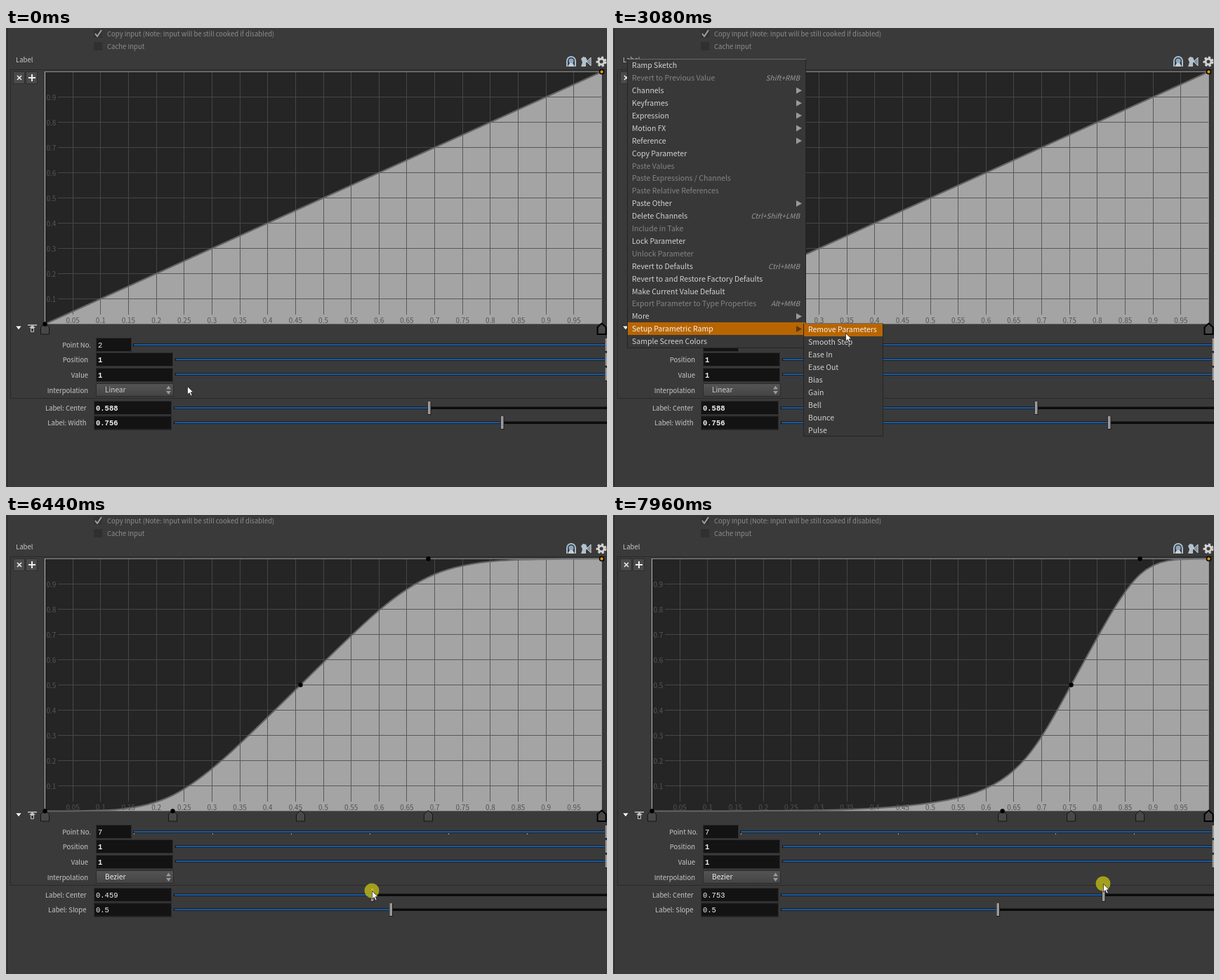
These frames come from a looping animation (856x655 px, 8 s). An HTML page with a canvas:

```html
<!DOCTYPE html>
<html lang="en">
<head>
<meta charset="utf-8">
<title>Ramp editor</title>
<style>
html, body { margin: 0; width: 100%; height: 100%; overflow: hidden; background: #3a3a3a; }
canvas { display: block; width: 856px; height: 655px; }
</style>
</head>
<body>
<canvas id="stage" width="856" height="655"></canvas>
<script>
const ctx = document.getElementById('stage').getContext('2d');
const SANS = '"Noto Sans CJK JP","Noto Sans CJK SC","Noto Sans CJK","Noto Sans",sans-serif';
const MONO = '"Liberation Mono","Noto Sans Mono",monospace';
const LOOP = 8000, ACCENT = '#b86500';
const MENU_OPEN = 1000, SUB_OPEN = 1880, MENU_CLOSE = 3880, RAMP_SET = 3960, DRAG = 6240;

// time, x, y of the pointer before the drag; each leg is eased
const travel = [
  [0, 258, 511], [200, 258, 511], [960, 17, 44], [1360, 17, 44], [1900, 131, 434],
  [2680, 131, 434], [3080, 331, 435], [3480, 318, 449], [3959, 318, 449], [3960, 28, 112],
  [4100, 28, 112], [4160, 62, 131], [4960, 450, 525], [5240, 557, 555], [5400, 547, 532],
  [5559, 547, 532], [5560, 547, 538], [DRAG, 547, 538]
];
// time, x, y and centre value while dragging
const drag = [
  [DRAG, 547, 538, .5], [6340, 541, 537, .491], [6440, 521, 536, .459], [6700, 420, 530, .296],
  [6880, 343, 525, .171], [6960, 325, 524, .142], [7040, 317, 522, .128], [7100, 317, 522, .128],
  [7240, 360, 522, .18], [7460, 510, 525, .43], [7660, 680, 527, .705], [7800, 727, 527, .79],
  [7959, 727, 527, .79], [7960, 698, 526, .753], [LOOP, 698, 526, .753]
];
const pressed = t => (t >= 920 && t < 1400) || (t >= 3800 && t < MENU_CLOSE) || t >= DRAG;

// "-" marks a disabled item, ">" a submenu, "|" a shortcut
const mainItems = ['Ramp Sketch', '-Revert to Previous Value|Shift+RMB', 'Channels>', 'Keyframes>',
  'Expression>', 'Motion FX>', 'Reference>', 'Copy Parameter', '-Paste Values',
  '-Paste Expressions / Channels', '-Paste Relative References', 'Paste Other>',
  'Delete Channels|Ctrl+Shift+LMB', '-Include in Take', 'Lock Parameter', '-Unlock Parameter',
  'Revert to Defaults|Ctrl+MMB', 'Revert to and Restore Factory Defaults',
  'Make Current Value Default', '-Export Parameter to Type Properties|Alt+MMB', 'More>',
  'Setup Parametric Ramp>', 'Sample Screen Colors'];
const subItems = ['Remove Parameters', 'Smooth Step', 'Ease In', 'Ease Out', 'Bias', 'Gain',
  'Bell', 'Bounce', 'Pulse'];
const SETUP_ROW = 21, ROW = 17.9;

function sample(keys, t, eased) {
  let i = 0;
  while (i < keys.length - 2 && t >= keys[i + 1][0]) i++;
  const a = keys[i], b = keys[i + 1];
  let u = Math.min(1, (t - a[0]) / (b[0] - a[0]));
  if (eased) u = u * u * (3 - 2 * u);
  return a.slice(1).map((v, k) => v + (b[k + 1] - v) * u);
}

const X = v => 55.5 + 793 * v;
const Y = v => 422.5 - 360 * v;

function rect(x, y, w, h, color) { ctx.fillStyle = color; ctx.fillRect(x, y, w, h); }

function box(x, y, w, h, color) {
  ctx.strokeStyle = color; ctx.lineWidth = 1;
  ctx.strokeRect(x + .5, y + .5, w - 1, h - 1);
}

function line(x1, y1, x2, y2, color, width = 1) {
  ctx.strokeStyle = color; ctx.lineWidth = width;
  ctx.beginPath(); ctx.moveTo(x1, y1); ctx.lineTo(x2, y2); ctx.stroke();
}

function poly(points, fill, stroke, width = 1) {
  ctx.beginPath();
  points.forEach(([x, y]) => ctx.lineTo(x, y));
  ctx.closePath();
  if (fill) { ctx.fillStyle = fill; ctx.fill(); }
  if (stroke) { ctx.strokeStyle = stroke; ctx.lineWidth = width; ctx.stroke(); }
}

function disc(x, y, r, fill, stroke) {
  ctx.beginPath(); ctx.arc(x, y, r, 0, 7);
  ctx.fillStyle = fill; ctx.fill();
  if (stroke) { ctx.strokeStyle = stroke; ctx.lineWidth = 1.5; ctx.stroke(); }
}

// y is the visual middle of the line
function text(s, x, y, color, { size = 9.5, align = 'left', style = '', family = SANS } = {}) {
  ctx.font = `${style} ${size}px ${family}`;
  ctx.textAlign = align;
  ctx.fillStyle = color;
  ctx.fillText(s, x, y + 3.8);
}

function field(x, y, w, value, bold) {
  rect(x, y - 10, w, 20, '#131313');
  box(x, y - 10, w, 20, '#2c2c2c');
  text(value, x + 3, y, '#f2f2f2', { size: 10.5, style: bold ? 'bold' : '', family: MONO });
}

function slider(x, y, handle) {
  rect(x, y - 1.5, 856 - x, 3.5, '#0c0c0c');
  rect(x + 1, y - .75, handle - x, 2, '#2163ad');
  rect(handle - 2, y - 9, 5, 19, '#1c1c1c');
  rect(handle - 1.5, y - 9, 3.5, 18, '#9a9a9a');
}

function header() {
  const dim = '#8d8d8d';
  rect(125, 2, 12, 12, '#333');
  ctx.lineJoin = 'round';
  ctx.strokeStyle = '#a0a0a0'; ctx.lineWidth = 2;
  ctx.beginPath(); ctx.moveTo(127, 8); ctx.lineTo(130, 12); ctx.lineTo(136, 3); ctx.stroke();
  text('Copy Input (Note: Input will be still cooked if disabled)', 144, 8, dim);
  rect(125, 20, 12, 12, '#303030');
  text('Cache Input', 144, 26, dim);
  text('Label', 14, 45, '#c8c8c8');

  // preset arch, speaking head and gear
  ctx.lineWidth = 2; ctx.strokeStyle = '#a9bccb';
  ctx.beginPath(); ctx.moveTo(799, 55); ctx.lineTo(799, 47); ctx.arc(805, 47, 6, Math.PI, 0);
  ctx.lineTo(811, 55); ctx.stroke();
  disc(805, 47, 3.5, '#86a9c6');
  poly([[800, 55], [803, 50], [807, 50], [810, 55]], '#c3ced6');
  poly([[819, 44], [822, 41], [826, 42], [828, 47], [826, 50], [826, 55], [819, 55], [821, 49]], '#b4c1cb');
  poly([[827, 48], [833, 42], [833, 54]], '#7890a5', '#d0d0d0');
  ctx.strokeStyle = '#d2d2d2'; ctx.lineWidth = 3;
  ctx.setLineDash([3, 2.5]);
  ctx.beginPath(); ctx.arc(848, 48, 6, 0, 7); ctx.stroke();
  ctx.setLineDash([]);
  ctx.beginPath(); ctx.arc(848, 48, 4, 0, 7); ctx.stroke();
}

function grid(color) {
  for (let i = 1; i < 20; i++) {
    const x = Math.floor(X(i / 20)) + .5;
    line(x, 63, x, 409, color);
  }
  for (let i = 1; i < 10; i++) line(74, Y(i / 10), 848, Y(i / 10), color);
}

function traceRamp(c, w) {
  ctx.beginPath();
  ctx.moveTo(X(0), Y(0));
  if (c === null) return ctx.lineTo(X(1), Y(1));
  const lo = X(c - w), hi = X(c + w);
  ctx.bezierCurveTo(lo, Y(0), lo, Y(0), X(c), Y(.5));
  ctx.bezierCurveTo(hi, Y(1), hi, Y(1), X(1), Y(1));
}

function marker(x, stroke, width) {
  poly([[x - 6, 437], [x - 6, 427], [x, 421.5], [x + 6, 427], [x + 6, 437]], '#484848', stroke, width);
}

function plot(c, firstLit) {
  const w = c === null ? 0 : .5 * Math.min(c, 1 - c);
  const edge = '#8e8e8e';
  rect(55, 62, 794, 361, '#252525');
  grid('#464646');
  ctx.save();
  traceRamp(c, w);
  ctx.lineTo(X(1), Y(0));
  ctx.closePath();
  ctx.fillStyle = '#a4a4a4'; ctx.fill();
  ctx.clip();
  grid('#595959');
  ctx.restore();
  traceRamp(c, w);
  ctx.strokeStyle = '#656565'; ctx.lineWidth = 2; ctx.stroke();

  for (let i = 1; i < 10; i++) text(`0.${i}`, 57.5, Y(i / 10) + .5, '#565656', { size: 10 });
  for (let i = 1; i < 20; i++) text(String(i / 20), X(i / 20), 417, '#525252', { size: 10, align: 'center' });
  line(55, 62.5, 849, 62.5, edge);
  line(55.5, 62, 55.5, 423, '#b4b4b4');
  line(848.5, 62, 848.5, 423, edge);
  rect(849, 62, 2, 361, '#333');

  const knots = c === null ? [[0, 0]] : [[0, 0], [c - w, 0], [c, .5], [c + w, 1]];
  knots.forEach(([k], i) => marker(X(k), i === 0 && firstLit ? '#c98a1e' : '#141414', 1));
  marker(X(1), '#000', 2);
  knots.forEach(([k, v]) => disc(X(k), Y(v), 3.2, '#000'));
  disc(X(1), Y(1), 3, '#d8950f', '#000');
}

function panel(c, handle) {
  const preset = c === null, label = '#c8c8c8';
  rect(0, 0, 1, 655, '#444');
  rect(1, 0, 1, 655, '#272727');
  line(6, 59.5, 856, 59.5, '#2a2a2a');
  line(6.5, 59, 6.5, 528, '#2a2a2a');
  line(6, 528.5, 856, 528.5, '#2a2a2a');
  for (const x of [10, 28]) {
    rect(x, 62, 17, 18, '#4b4b4b');
    box(x, 62, 17, 18, '#2c2c2c');
  }
  line(16, 68, 22, 74, '#eee', 1.6); line(22, 68, 16, 74, '#eee', 1.6);
  line(32, 71, 42, 71, '#eee', 2); line(37, 66, 37, 76, '#eee', 2);
  poly([[13.5, 425], [22.5, 425], [18, 431]], '#f2f2f2', '#111', .7);
  line(31, 424, 44, 424, '#c4c4c4', 1.5);
  poly([[33, 428], [37.5, 424], [42, 428]], '#c4c4c4');
  ctx.strokeStyle = '#c4c4c4'; ctx.lineWidth = 1;
  ctx.strokeRect(35.5, 428.5, 4, 5);

  const name = (s, x, y) => text(s, x, y, label, { align: 'right' });
  name('Point No.', 121, 452);
  name('Position', 117, 473);
  name('Value', 117, 495);
  name('Interpolation', 117, 517);
  field(128, 452, 51, preset ? '2' : '7');
  field(128, 473, 110, '1', true);
  field(128, 495, 110, '1', true);
  slider(181, 452, 855);
  if (!preset) for (let i = 0; i < 6; i++) rect(182 + 112 * i, 454, 1, 2, '#a0a0a0');
  slider(241, 473, 855);
  slider(241, 494, 855);

  const shade = ctx.createLinearGradient(0, 507, 0, 526);
  shade.addColorStop(0, '#555'); shade.addColorStop(1, '#434343');
  rect(128, 507, 111, 19, shade);
  box(128, 507, 111, 19, '#2a2a2a');
  text(preset ? 'Linear' : 'Bezier', 141, 516.5, preset ? '#cfcfcf' : '#ededed',
    { size: 10.1, style: preset ? '' : '500' });
  poly([[228, 515.5], [235, 515.5], [231.5, 510.5]], '#999');
  poly([[228, 518], [235, 518], [231.5, 523]], '#999');

  name('Label: Center', 114.5, 542);
  name(preset ? 'Label: Width' : 'Label: Slope', 114.5, 563.5);
  field(125, 542, 111, preset ? '0.588' : String(+c.toFixed(3)), preset);
  field(125, 563.5, 111, preset ? '0.756' : '0.5', preset);
  slider(239, 542, handle);
  slider(239, 563, preset ? 706.5 : 548);
}

function menu(items, x, y, w, h, hovered) {
  rect(x, y, w, h, '#383838');
  box(x, y, w, h, '#242424');
  line(x, y + .5, x + w, y + .5, '#6a6a6a');
  items.forEach((item, i) => {
    const [body, keys] = item.split('|');
    const mid = y + 9.5 + ROW * i;
    const color = body[0] === '-' ? '#848484' : '#d2d2d2';
    if (i === hovered) rect(x + 1, Math.round(mid - 9), w - 2, 18, ACCENT);
    text(body.replace(/^-|>$/g, ''), x + 7, mid, i === hovered ? '#f0f0f0' : color, { size: 10.5 });
    if (keys) text(keys, x + 246, mid, '#9a9a9a', { size: 10, align: 'right', style: 'italic' });
    if (body.endsWith('>')) {
      const fill = i === hovered ? '#5a3a10' : '#9a9a9a';
      poly([[x + 241, mid - 4.5], [x + 249, mid], [x + 241, mid + 4.5]], fill);
    }
  });
}

function menus(t, px, py) {
  const subShown = t >= SUB_OPEN;
  const inMain = px >= 20 && px < 271;
  const mainRow = subShown ? SETUP_ROW : inMain ? Math.floor((py - 44.5) / ROW) : -1;
  menu(mainItems, 20, 44, 255, 413, mainRow);
  if (subShown) menu(subItems, 271, 421, 114, 162, px >= 271 ? Math.floor((py - 421.5) / ROW) : -1);
}

function pointer(x, y, down) {
  if (down) disc(x, y, 10.5, 'rgba(200,195,20,.75)');
  poly([[0, 0], [0, 11.5], [2.7, 9], [4.6, 13.4], [6.6, 12.5], [4.8, 8.3], [8.3, 8.2]]
    .map(([dx, dy]) => [x + .5 + dx, y + .5 + dy]), '#fff', '#222', .8);
}

function draw(now) {
  const t = Math.floor((now % LOOP) / 40) * 40;
  const dragging = t >= DRAG;
  const [px, py, value = .5] = dragging ? sample(drag, t) : sample(travel, t, true);
  const c = t < RAMP_SET ? null : value;
  const handle = c === null ? 602.5 : dragging ? px + .5 : 548;
  rect(0, 0, 856, 655, '#3a3a3a');
  header();
  panel(c, handle);
  plot(c, t >= RAMP_SET && t < 4560);
  if (t >= MENU_OPEN && t < MENU_CLOSE) menus(t, px, py);
  pointer(px, py, pressed(t));
}

const start = performance.now();
function tick() {
  draw(performance.now() - start);
  requestAnimationFrame(tick);
}
tick();
</script>
</body>
</html>
```
